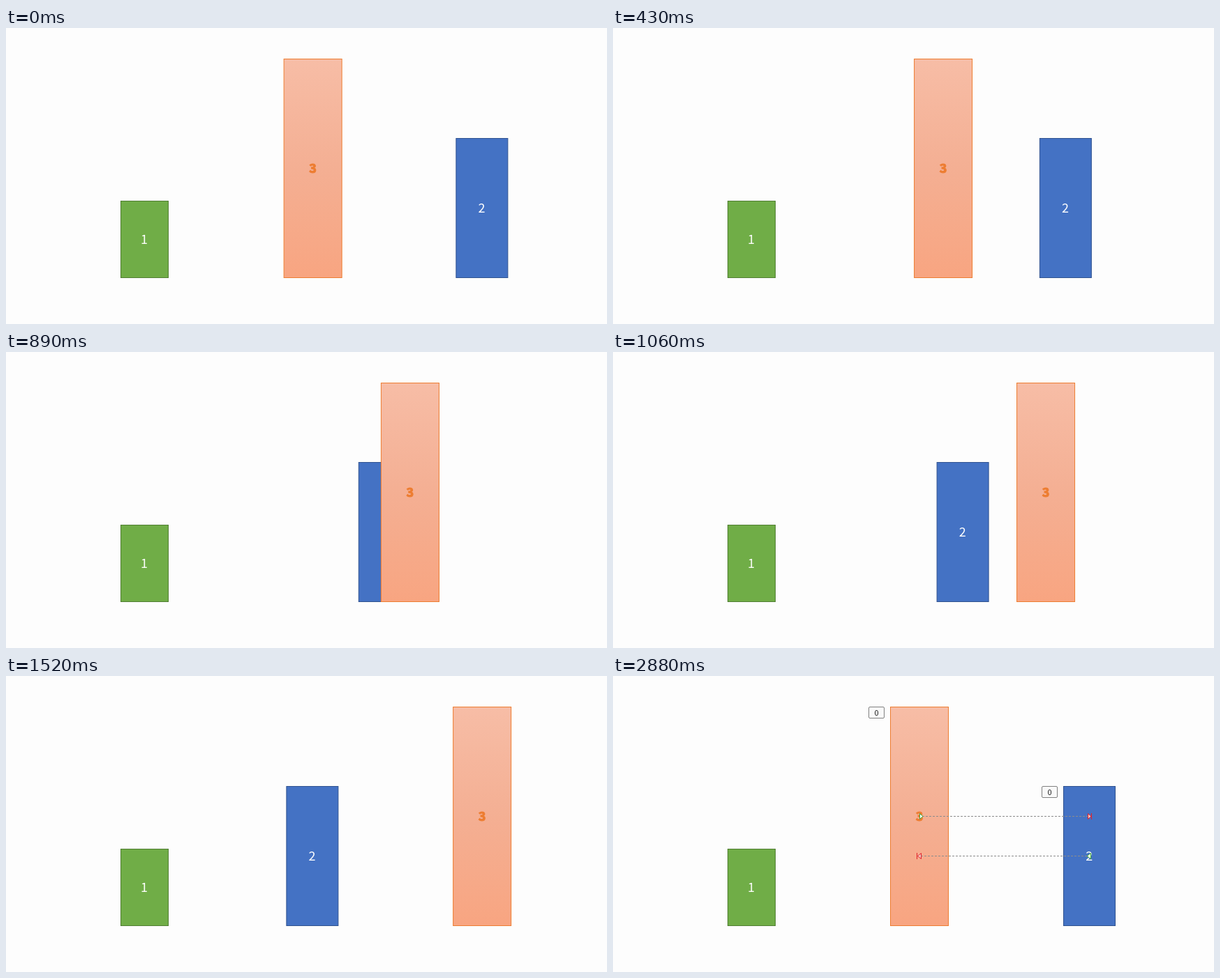
Write an HTML page that moves like this. It is 861 by 425 pixels and loops after 2980 ms.

```html
<!DOCTYPE html>
<html lang="en">
<head>
<meta charset="utf-8">
<title>Swapping bars</title>
<style>
  html, body { margin: 0; width: 100%; height: 100%; overflow: hidden; background: #fdfdfd; }
  svg { display: block; width: 861px; height: 425px; }
  text { font: 18px "Noto Sans CJK SC", "Noto Sans CJK JP", "Noto Sans CJK", sans-serif; text-anchor: middle; fill: #fff; }
  #tall text { font-weight: 700; fill: #ed7d31; stroke: #ed7d31; stroke-width: 1; }
  .tag rect { fill: #f9f9f9; stroke: #808080; }
  .tag text { font-size: 11px; fill: #222; }
  .path { stroke: #8c8c8c; stroke-dasharray: 3 2; }
  .start { fill: #fff; stroke: #3fa535; }
  .end { fill: #f3c9c4; stroke: #e0202a; }
</style>
</head>
<body>
<svg viewBox="0 0 861 425">
  <defs>
    <linearGradient id="peach" x1="0" y1="0" x2="0" y2="1">
      <stop offset="0" stop-color="#f7bda6"/>
      <stop offset=".5" stop-color="#f4af93"/>
      <stop offset="1" stop-color="#f8a581"/>
    </linearGradient>
  </defs>
  <g>
    <rect x="164.5" y="248.5" width="68" height="110" fill="#70ad47" stroke="#507e32"/>
    <text x="198" y="309.5">1</text>
  </g>
  <g id="mid">
    <rect y="158.5" width="74" height="200" fill="#4472c4" stroke="#2f528f"/>
    <text x="36.7" y="265">2</text>
  </g>
  <g id="tall">
    <rect y="44.5" width="83" height="314" fill="url(#peach)" stroke="#ed7d31"/>
    <text x="41.5" y="208">3</text>
  </g>
  <g id="guides">
    <g class="tag">
      <rect x="366.5" y="44.5" width="22" height="16" rx="1.5"/>
      <text x="377.5" y="56.8">0</text>
    </g>
    <g class="tag">
      <rect x="614.5" y="158.5" width="22" height="16" rx="1.5"/>
      <text x="625.5" y="170.8">0</text>
    </g>
    <path class="path" d="M443 201.5H681M441 258.5H680"/>
    <path class="start" d="M439.5 197.5L444 201.5L439.5 205.5ZM684.5 254.5L679 258.5L684.5 262.5Z"/>
    <path class="end" d="M680.5 197.5L685 201.5L680.5 205.5ZM685.5 197V206M441.5 254.5L436.5 258.5L441.5 262.5ZM435.5 254V263"/>
  </g>
</svg>
<script>
  const LOOP = 2980, GUIDES_AT = 2880;
  const STEP = 57, FIRST_STEP = 87.5;
  const EASE_START = -70, EASE_TIME = 1792;
  const [mid, tall, guides] = ["mid", "tall", "guides"].map(id => document.getElementById(id));

  // The picture advances in steps of about 57 ms, on a 10 ms clock.
  function heldTime(t) {
    const k = Math.floor((Math.floor(t / 10) * 10 + 4.9 - FIRST_STEP) / STEP);
    return k < 0 ? 0 : Math.round((FIRST_STEP + STEP * k) / 10) * 10;
  }

  function ease(t) {
    const u = Math.min(1, Math.max(0, (t - EASE_START) / EASE_TIME));
    return u * u * u * (10 - 15 * u + 6 * u * u);
  }

  const place = (bar, x) => bar.setAttribute("transform", `translate(${x.toFixed(2)} 0)`);

  function draw(t) {
    const editing = t >= GUIDES_AT;
    const p = ease(heldTime(t));
    place(tall, editing ? 397.5 : 398 + 246 * p);
    place(mid, editing ? 645.5 : 645 - 246.5 * p);
    guides.style.display = editing ? "" : "none";
  }

  const began = performance.now();
  function tick() {
    draw((performance.now() - began) % LOOP);
    requestAnimationFrame(tick);
  }
  tick();
</script>
</body>
</html>
```
